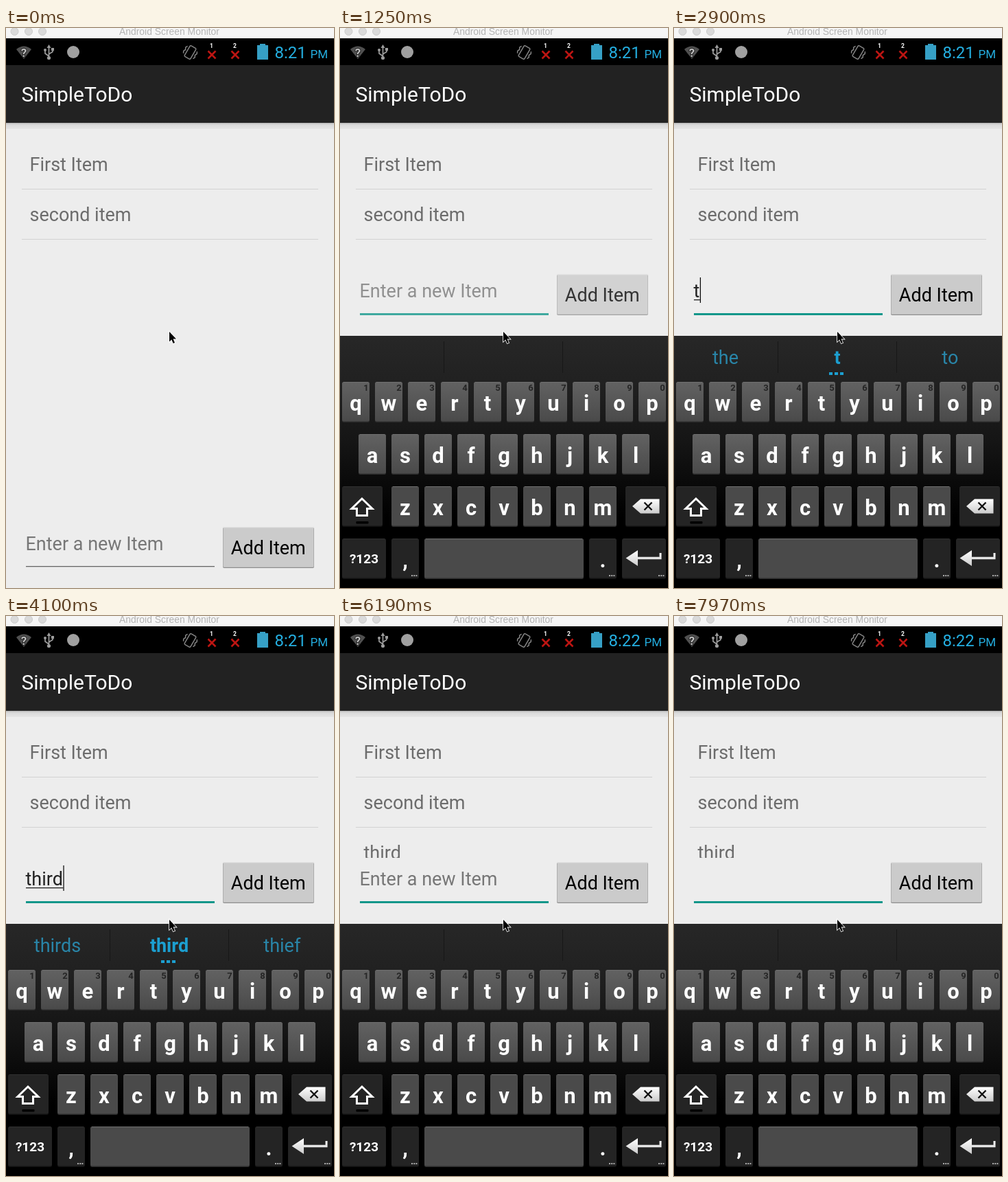
An HTML page that plays this animation: 478 by 815 pixels, repeating every 8 s.

```html
<!DOCTYPE html>
<html lang="en">
<head>
<meta charset="utf-8">
<title>SimpleToDo</title>
<style>
  html, body { margin: 0; width: 100%; height: 100%; overflow: hidden; background: #ededed; }
  svg { display: block; width: 478px; height: 815px; font-family: Roboto, sans-serif; font-size: 27px; }
  text { white-space: pre; }
  .mid { text-anchor: middle; }
  .bold { font-weight: 700; }
  .item { fill: #6c6c6c; }
  .clock { fill: #24aee0; }
  .line { fill: none; stroke-linecap: butt; }
  .key { font-size: 31px; fill: #fff; }
  .digit { font-size: 13px; fill: #252525; }
  .side { fill: #2985a8; }
  .settling { opacity: .78; }
</style>
</head>
<body>
<svg viewBox="0 0 478 815">
  <defs>
    <linearGradient id="shade" x2="0" y2="1">
      <stop stop-color="#b4b4b4"/><stop offset=".3" stop-color="#d9d9d9"/>
      <stop offset="1" stop-color="#e5e5e5"/>
    </linearGradient>
    <linearGradient id="board" x2="0" y2="1">
      <stop stop-color="#272727"/><stop offset=".18" stop-color="#212121"/>
      <stop offset=".42" stop-color="#151515"/><stop offset=".72" stop-color="#000"/>
    </linearGradient>
    <linearGradient id="light" x2="0" y2="1">
      <stop stop-color="#626262"/><stop offset="1" stop-color="#4a4a4a"/>
    </linearGradient>
    <linearGradient id="icon" x2="0" y2="1">
      <stop stop-color="#fff"/><stop offset="1" stop-color="#ccc"/>
    </linearGradient>
    <clipPath id="list"><rect y="147" width="478" height="205"/></clipPath>
    <g id="noSignal">
      <path class="line" d="M-5.5 33.5l11 11M5.5 33.5l-11 11" stroke="#bd1512" stroke-width="2.6"/>
    </g>
  </defs>

  <rect width="478" height="815" fill="#ededed"/>
  <rect width="478" height="15" fill="#f6f6f6"/>
  <g fill="#dadada" stroke="#cbcbcb">
    <circle cx="12.5" cy="5" r="5.5"/><circle cx="33" cy="5" r="5.5"/><circle cx="53" cy="5" r="5.5"/>
  </g>
  <text x="165" y="10" font-size="13.9" fill="#b3b3b3" style="font-family: 'Liberation Sans', sans-serif">Android Screen Monitor</text>

  <rect y="15" width="478" height="39"/>
  <path d="M26 45L15 31Q26 22 37 31Z" fill="#505050"/>
  <text class="mid bold" x="26" y="42" font-size="17" fill="#c4c4c4" stroke="#111" stroke-width="1.5" paint-order="stroke">?</text>
  <g class="line" stroke="#9c9c9c" stroke-width="1.7">
    <path d="M62.5 28V43M62.5 41L57 37V33M62.5 38L68 34.5V31"/>
    <path fill="#9c9c9c" stroke="none" d="M62.5 24l3 5h-6zM66 29h4v4h-4z"/>
    <circle cx="57" cy="32" r="2" fill="#9c9c9c" stroke="none"/>
    <circle cx="62.5" cy="43.5" r="2.6" fill="#9c9c9c" stroke="none"/>
  </g>
  <circle cx="98" cy="35" r="9" fill="#a0a0a0"/>
  <g class="line" stroke="#858585" stroke-width="1.5" transform="translate(268.5 35.5) rotate(30)">
    <rect x="-5" y="-9" width="10" height="18" rx="1.5"/>
    <path d="M-8 -6l-1.5 3 1.5 3-1.5 3 1.5 3M8 -6l1.5 3-1.5 3 1.5 3-1.5 3"/>
  </g>
  <use href="#noSignal" x="300"/><use href="#noSignal" x="334"/>
  <g class="mid bold" font-size="8.5" fill="#fff"><text x="299.5" y="29">1</text><text x="333.5" y="29">2</text></g>
  <path d="M366 25h4v-2h8v2h4v21h-16z" fill="#36a0c6"/>
  <text class="clock" id="clock" x="391.5" y="44" font-size="24">8:21</text>
  <text class="clock" x="443.5" y="44" font-size="17">PM</text>

  <rect y="54" width="478" height="84" fill="#222"/>
  <rect y="138" width="478" height="9" fill="url(#shade)"/>
  <text x="22.5" y="107" font-size="30" fill="#fff">SimpleToDo</text>

  <g class="item" clip-path="url(#list)">
    <text x="34.5" y="208">First Item</text>
    <text x="34.5" y="281">second item</text>
    <text x="34.5" y="354" id="third">third</text>
  </g>
  <path class="line" d="M23 234.5H455M23 307.5H455" stroke="#d2d2d2"/>

  <g id="form">
    <text id="hint" x="28.5" y="760" fill="#777">Enter a new Item</text>
    <text id="typed" x="28.5" y="760" fill="#222"></text>
    <rect id="composing" x="29" y="763" height="1.3" fill="#222"/>
    <rect id="rule" x="29" y="783" width="275"/>
    <rect x="316" y="727" width="133" height="59" rx="2" fill="#8e8e8e"/>
    <rect x="316" y="726.5" width="133" height="1.5" fill="#d8d8d8"/>
    <rect x="316.5" y="727.5" width="132" height="57.3" rx="1.5" fill="#cbcbcb"/>
    <text class="mid" x="382.3" y="766">Add Item</text>
  </g>
  <rect id="caret" width="1.2"/>

  <g id="keyboard">
    <rect y="448" width="478" height="367" fill="url(#board)"/>
    <path class="line" d="M151.5 456V502M324.5 456V502" stroke="#171717"/>
    <g class="mid">
      <text class="side" id="left" x="75" y="489"></text>
      <text class="bold" id="middle" x="238" y="489" fill="#1c9fd0"></text>
      <text class="side" id="right" x="402.3" y="489"></text>
    </g>
    <path id="more" d="M226 501h5v4h-5zM234 501h5v4h-5zM242 501h5v4h-5z" fill="#1c9fd0"/>
    <g id="keys"></g>
    <path class="line" d="M32 685L47 699.5H39.5V709.5H24.5V699.5H17Z" stroke="#fff" stroke-width="3"/>
    <rect x="23.5" y="718" width="18" height="3.5" rx="1"/>
    <path d="M426 696L438 685.5H465.500V706.5H438Z" fill="url(#icon)"/>
    <path class="line" d="M443.500 690.5l11 11M454.500 690.5l-11 11" stroke="#111" stroke-width="2.4"/>
    <path d="M416.500 771.500L434 760V769.800H465.500V764H468.500V773.200H434V783Z" fill="url(#icon)"/>
  </g>

  <path d="M238 442V456.500L241.300 453.500L243.700 459L246 458L243.600 452.600H248Z" stroke="#fff" stroke-width="1.6" paint-order="stroke"/>
</svg>
<script>
const byId = id => document.getElementById(id);
const keys = byId('keys');

function add(tag, attrs, text = '') {
  const node = document.createElementNS('http://www.w3.org/2000/svg', tag);
  for (const name in attrs) node.setAttribute(name, attrs[name]);
  node.textContent = text;
  keys.append(node);
}

function addKey(x, y, width, dark, label = '') {
  add('rect', { x, y: y + 1, width, height: 58, rx: 2.5, fill: dark ? '#111' : '#2c2c2c' });
  add('rect', { x, y, width, height: 57.5, rx: 2.5, fill: dark ? '#242424' : y > 660 ? '#4a4a4a' : 'url(#light)' });
  add('path', { class: 'line', d: `M${x + 2} ${y + .5}h${width - 4}`, stroke: dark ? '#303030' : '#707070' });
  add('text', { class: 'mid bold key', x: x + width / 2, y: y + 42 }, label);
}

['qwertyuiop', 'asdfghjkl', 'zxcvbnm'].forEach((letters, row) => {
  [...letters].forEach((letter, i) => addKey([3, 27, 75][row] + 48 * i, 515 + 76 * row, 40, false, letter));
});
for (let i = 0; i < 10; i++) {
  add('text', { class: 'mid bold digit', x: 38 + 48 * i, y: 528 }, (i + 1) % 10);
}
addKey(3, 667, 59, true);
addKey(416, 667, 59, true);
addKey(3, 743, 64, true);
addKey(75, 743, 40, true, ',');
addKey(123, 743, 232, false);
addKey(363, 743, 40, true, '.');
addKey(411, 743, 64, true);
add('text', { class: 'mid bold', x: 35, y: 779, 'font-size': 19, fill: '#fff' }, '?123');
for (const x of [104, 392, 464]) {
  add('path', { d: `M${x} 796h2v2h-2zm3.2 0h2v2h-2zm3.2 0h2v2h-2z`, fill: '#aaa' });
}

// Each step overrides the values that change at its time.
const LOOP = 8000;
const noWords = ['', '', ''];
const steps = [
  [0, { clock: '8:21', typed: '', words: noWords, hint: true }],
  [500, { focus: true, caret: true }],
  [1250, { keyboard: true, settling: true, caret: false }],
  [1400, { settling: false }],
  [1850, { caret: true }],
  [2450, { caret: false }],
  [2900, { caret: true, hint: false, typed: 't', words: ['the', 't', 'to'] }],
  [3200, { typed: 'th' }],
  [3500, { typed: 'thi', words: ['this', 'thi', 'think'] }],
  [3950, { typed: 'thir' }],
  [4100, { typed: 'third', words: ['thirds', 'third', 'thief'] }],
  [4700, { typed: '', words: noWords, hint: true, added: true }],
  [5150, { clock: '8:22', caret: false }],
  [5600, { caret: true }],
  [6190, { caret: false }],
  [6640, { caret: true }],
  [7230, { caret: false }],
  [7680, { caret: true, hint: false, lowCaret: true }],
  [7970, { caret: false }]
];
let state = {};
const states = steps.map(([, change]) => state = { ...state, ...change });

const show = (id, on) => byId(id).style.display = on ? '' : 'none';
const set = (id, name, value) => byId(id).setAttribute(name, value);

function render(s) {
  const typed = byId('typed');
  byId('clock').textContent = s.clock;
  typed.textContent = s.typed;
  ['left', 'middle', 'right'].forEach((id, i) => byId(id).textContent = s.words[i]);
  show('more', s.words[1]);
  show('hint', s.hint);
  show('third', s.added);
  show('keyboard', s.keyboard);
  show('caret', s.caret);

  const width = s.typed ? typed.getComputedTextLength() : 0;
  const shift = s.keyboard ? -368 : 0;
  set('form', 'transform', `translate(0 ${shift})`);
  set('form', 'class', s.settling ? 'settling' : '');
  set('composing', 'width', width);
  set('rule', 'height', s.focus ? 3 : 1.3);
  set('rule', 'fill', s.focus ? '#0f968a' : '#666');
  set('caret', 'x', 29 + width);
  set('caret', 'y', (s.lowCaret ? 739 : 731) + shift);
  set('caret', 'height', s.lowCaret ? 35 : 37);
}

const start = performance.now();
let current = -1;
function tick() {
  const time = (performance.now() - start) % LOOP;
  const index = steps.findLastIndex(([at]) => at <= time);
  if (index !== current) render(states[current = index]);
  requestAnimationFrame(tick);
}
tick();
</script>
</body>
</html>
```
